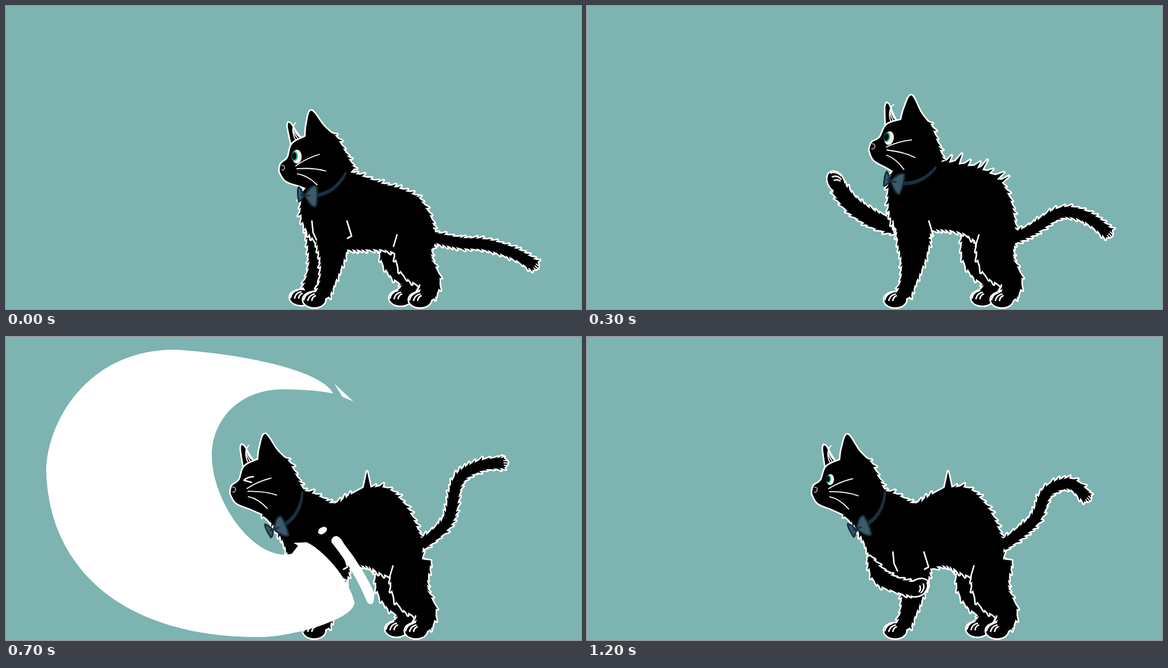
Animation of 1000x527 px, one loop 1400 ms. Source, as an HTML page:

```html
<!DOCTYPE html>
<html lang="en">
<head>
<meta charset="utf-8">
<title>Cat swipe</title>
<style>
html, body { margin: 0; width: 100%; height: 100%; overflow: hidden; background: #7db3b0; }
svg { display: block; width: 100%; height: 100%; }
.rim { fill: #fff; stroke: #fff; stroke-width: 5.4; stroke-linejoin: round; }
.line { fill: none; stroke: #fff; stroke-width: 2.6; stroke-linecap: round; stroke-linejoin: round; }
.thin { stroke-width: 1.8; }
.smear path { fill: #fff; transform-box: fill-box; transform-origin: center; }
</style>
</head>
<body>
<svg id="stage" viewBox="0 0 1000 527"></svg>
<script>
const stage = document.getElementById('stage');
const STEP = 100, LOOP = 1400;

// ---- geometry ----
const rnd = i => { const v = Math.sin(i * 91.7 + 4.1) * 4375.5; return v - Math.floor(v); };
const points = s => s.trim().split(/\s+/).map(p => p.split(',').map(Number));
const path = p => 'M' + p.map(q => q.map(v => v.toFixed(1))).join('L') + 'Z';

function unit(a, b) {
  const dx = b[0] - a[0], dy = b[1] - a[1], l = Math.hypot(dx, dy) || 1;
  return [dx / l, dy / l];
}

// Catmull-Rom curve sampled about every 2.5 px
function spline(p) {
  const out = [p[0]];
  for (let i = 0; i < p.length - 1; i++) {
    const b = p[i], c = p[i + 1], a = p[i - 1] || b, d = p[i + 2] || c;
    const n = Math.max(2, Math.round(Math.hypot(c[0] - b[0], c[1] - b[1]) / 2.5));
    for (let k = 1; k <= n; k++) {
      const t = k / n;
      out.push(b.map((v, j) => v + t / 2 * (c[j] - a[j] +
        t * (2 * a[j] - 5 * v + 4 * c[j] - d[j] + t * (3 * (v - c[j]) + d[j] - a[j])))));
    }
  }
  return out;
}

// Saw teeth along a curve; the sign of amp sets which way they lean
function fur(p, amp, len = 4) {
  const out = [];
  for (let i = 0, k = 0; i < p.length - 1; k++) {
    const n = Math.min(i + Math.floor(len * (.8 + .7 * rnd(k))), p.length - 1);
    const a = p[i], b = p[n], [tx, ty] = unit(a, b);
    const h = Math.abs(amp) * (.5 + .7 * rnd(k + 40));
    const at = (f, along, up) => [a[0] + (b[0] - a[0]) * f + tx * along + ty * up,
                                  a[1] + (b[1] - a[1]) * f + ty * along - tx * up];
    if (amp > 0) out.push(a, at(.6, 0, h * .25), at(1, 2, h), at(1, -1, -1));
    else out.push(at(0, 1, -1), at(0, -2, h), at(.4, 0, h * .25), b);
    i = n;
  }
  return out;
}

// "amp/length:points|..." where amp 0 is smooth and L is straight
function outline(s) {
  const out = [];
  let last;
  for (const part of s.split('|')) {
    const [mode, body] = part.split(':'), p = points(body), [amp, len] = mode.split('/').map(Number);
    if (last) p.unshift(last);
    last = p[p.length - 1];
    const curve = mode === 'L' ? p : spline(p);
    out.push(...(amp ? fur(curve, amp, len) : curve));
  }
  return path(out);
}

// Furry tube around a centre line; a third coordinate sets its half width
function limb(s, width) {
  const c = spline(points(s)), e = c.length - 1;
  const side = k => c.map(([px, py, w = width], i) => {
    const [x, y] = unit(c[Math.max(0, i - 1)], c[Math.min(e, i + 1)]);
    return [px + y * w * k, py - x * w * k];
  });
  const [tx, ty] = unit(c[e - 1], c[e]), w = (c[e][2] || width) * .8;
  const l = side(1), r = side(-1).reverse();
  const cap = spline([l[e], [c[e][0] + tx * w, c[e][1] + ty * w], r[0]]);
  return path([...fur(l, 4), ...cap, ...fur(r, -4)]);
}

// Crescent sliver between two points
function lens(x1, y1, x2, y2, bend, w) {
  const [x, y] = unit([x1, y1], [x2, y2]);
  const mid = k => `${(x1 + x2) / 2 + y * k},${(y1 + y2) / 2 - x * k}`;
  return `M${x1},${y1}Q${mid(bend + w / 2)} ${x2},${y2}Q${mid(bend - w / 2)} ${x1},${y1}Z`;
}

// ---- shapes ----
const HEAD = outline('0:476,288 478,275 490,264 498,240 521,227|0:523,205 531,182 552,208 566,221|' +
  '5/4:575,229 597,268 605,283|0:560,325 530,320|0:512,313 487,304 476,288');
const EAR = outline('0:497,243 490,208 494,204 505,221 514,232');
const HIND = limb('712,385,34 708,425,31 714,450,29 737,478,18 732,505,13');
const FAR_HIND = limb('675,385,22 672,430,21 685,458,19 704,478,14 695,500,12');
const LEG = limb('568,360,28 568,405,28 567,440,20 560,475,13 551,502,11');
const PAW = 'M-19,0a19,13 0 1,1 38,0a19,13 0 1,1 -38,0Z';
const TOES = 'M-18,0q2,-10 13,-13M-11,1q2,-9 11,-11M-4,1q1,-6 6,-8';
const CLAWS = [-1, 0, 1].map(k => limb(`667,202,9 ${668 + k * 12},${174 + k * 3},${9 - k * 2} ${672 + k * 22},${157 + k * 4},2`));

const crouch = {
  head: '475 281 0', bow: '518 328 0', hind: '0', eye: 1,
  torso: '6/4:602,290 650,308 690,320 718,334|5/4:738,366 744,395|' +
    '-5/4:742,420 690,430 655,423 605,423 560,420 532,402 514,365 520,318 560,280',
  tail: '742,402 790,412 835,415 885,431 920,452',
  arm: '532,380,12 536,420,10 537,455,10 526,492,9@513,507,0'
};
const rise = {
  ...crouch, head: '487 246 3.2', bow: '524 301 10', hind: '1',
  torso: '10/4:612,268 650,274 685,287 722,300|5/4:737,350 745,392|' +
    '-5/4:744,415 690,415 655,391 612,384 570,395 536,385 522,350 526,290 560,255',
  tail: '742,402 775,386 825,356 870,362 904,389',
  arm: '545,382,14 515,381,13 485,378,14 472,390,14@471,406,-45'
};
const arch = {
  ...rise, head: '496 240 17.3', bow: '531 304 14', hind: '2', eye: 0,
  torso: '24/6:624,274 665,281 700,288 722,316|5/4:739,338 745,392|' +
    '-5/4:744,415 690,415 655,398 612,392 570,395 540,390 529,350 532,295 570,255',
  tail: '742,406 775,391 825,362 870,373 911,403',
  arm: '600,300,14 590,250,14 578,215,12 566,195,10@554,181,60'
};
const reach = {
  ...arch, bow: '530 302 6', claws: true,
  tail: '742,396 775,379 825,343 870,352 912,378',
  arm: '635,275,12 648,245,15 662,215,15 666,200,13@667,190,90'
};
const lunge = {
  head: '391 265 3.6', bow: '467 333 -24', hind: '-7', eye: .8, swipe: true,
  torso: '6/4:512,266 540,275 570,291 600,274|L:622,262 628,234 634,262|6/4:666,265 700,302 722,352|' +
    '-5/4:724,375 715,415 665,415 625,397 592,404 540,420 503,405 482,355 460,320 445,303 480,260',
  tail: '722,364 778,318 800,270 840,255 870,280',
  arm: '490,382,2 508,415,12 535,430,11 565,438,11@576,436,150'
};

const SWOOSH = [
  'M569,98C545,55 400,28 293,22C140,22 70,150 70,235C75,400 200,522 440,522C500,522 606,490 606,462' +
    'C600,430 560,375 523,357L500,358L508,363L497,377C435,392 358,290 358,205C358,150 400,92 480,91Q530,91 569,98Z',
  'M571,81L604,112L585,104Z',
  'M543,341Q542,332 553,330Q561,331 557,338Q549,347 543,341Z',
  'M566,357Q565,347 575,346Q582,348 588,360Q620,400 641,446L639,462Q634,468 628,461Q605,405 566,357Z'
];
const SHARDS = [
  lens(60, 323, 117, 415, -18, 10), lens(125, 73, 175, 40, 9, 9), lens(374, 392, 353, 511, 16, 10),
  lens(411, 473, 413, 520, 0, 7), lens(601, 301, 684, 382, 18, 10), lens(100, 359, 113, 373, 0, 2),
  'M458,390L487,389L470,455Z', 'M500,387L515,385L557,483Q530,490 503,501Z',
  'M527,333L548,325L665,405Q660,425 630,442L598,462L550,370Q570,362 563,348Q555,336 527,333Z'
];

// ---- timeline ----
const mix = (a, b, k = .5) => {
  const n = b.match(/-?[\d.]+/g);
  let i = 0;
  return a.replace(/-?[\d.]+/g, v => +v + (n[i++] - v) * k);
};
function between(a, b) {
  const p = { ...a };
  for (const key of ['head', 'bow', 'hind', 'torso', 'tail', 'arm']) p[key] = mix(a[key], b[key]);
  return p;
}
const poses = [
  crouch, between(crouch, rise), rise,
  { ...between(rise, arch), arm: '540,385,12 500,372,13 460,345,13 438,317,12@433,306,60' },
  arch, between(arch, reach), reach,
  { ...lunge, head: '390 265 2.8', bow: '464 334 -24', eye: 0, smear: SWOOSH, size: 1,
    tail: '722,362 768,320 786,250 825,224 866,219' },
  ...[1, .7, .4, .15].map(size => ({ ...lunge, smear: SHARDS, size })),
  lunge
];

// ---- drawing ----
const line = (d, cls = '') => `<path class="line ${cls}" d="${d}"/>`;
const group = (tf, inner) => `<g transform="${tf}">${inner}</g>`;
const layer = (...shapes) => ['class="rim"', ''].map(a =>
  shapes.map(([d, tf = '']) => `<path ${a} d="${d}" transform="${tf}"/>`).join('')).join('');
const place = (x, y, r = 0) => `translate(${x},${y}) rotate(${r})`;
const foot = (limbPath, tf) => layer([limbPath], [PAW, tf]) + group(tf, line(TOES));

const eye = size => size
  ? group(`translate(506,262) scale(${size})`, '<ellipse rx="8.200" ry="12" fill="#fff1e8"/>' +
    '<ellipse cx="-4" cy="-1" rx="5.500" ry="8.500" fill="#16b5a2"/><ellipse cx="-5" cy="-1" rx="4" ry="6.500"/>')
  : line('M514,257Q503,258 498,264L511,267');
const FACE = line('M504,278Q522,265 545,258M506,283Q535,281 556,287M507,292Q525,295 541,311', 'thin') +
  '<path d="M478,277q8,-1 6,6q-2,4 -5,2" fill="none" stroke="#b9b9b9" stroke-width="1.500"/>';
const EAR_HAIR = line('M504,203Q493,212 507,230M500,207Q501,222 512,229M499,212Q498,224 504,233', 'thin');
const BOW = '<path d="M21,-2Q53,-6 72,-40L75,-37Q58,-1 21,5Z" fill="#17303f"/>' +
  '<g fill="#3d5a68" stroke="#17303f" stroke-width="3" stroke-linejoin="round">' +
  '<path d="M2,0L11,-11Q18,-17 22,-14Q25,2 21,20Q18,23 12,17Q5,9 2,2Z"/>' +
  '<path d="M-1,0Q-5,-10 -9,-13Q-12,-8 -9,12Q-6,13 -1,3Z"/><path d="M2,1L11,2M-2,1L-6,0"/></g>';

function tailTip(s) {
  const [a, b] = points(s).slice(-2), [x, y] = unit(a, b);
  return line([-4, 0, 4].map(k => `M${b[0] + y * k},${b[1] - x * k}l${x * 6 - y},${y * 6 + x}`).join(''), 'thin');
}

function draw(p) {
  const headAt = place(...p.head.split(' ')) + ' translate(-475,-281)';
  const hindAt = place(p.hind, 0);
  const [bone, hand] = p.arm.split('@'), handAt = place(...hand.split(','));
  const arm = p.claws ? layer([limb(bone)], ...CLAWS.map(c => [c])) : foot(limb(bone), handAt);
  const [front, near] = [place(536, 511), place(720, 511)];
  return '<rect width="1000" height="527" fill="#7db3b0"/>' +
    group(hindAt, foot(FAR_HIND, place(686, 508))) + (p.swipe ? '' : arm) +
    layer([EAR, headAt]) + group(headAt, EAR_HAIR) +
    layer([limb(p.tail, 8.5)], [HIND, hindAt], [PAW, `${hindAt} ${near}`], [LEG], [PAW, front],
      [outline(p.torso)], [HEAD, headAt]) +
    tailTip(p.tail) + group(front, line(TOES)) + (p.swipe ? arm : '') +
    group(hindAt, group(near, line(TOES)) + line('M680,398L674,418M593,374L601,400L594,404')) +
    line('M532,374L534,394L540,407') +
    group(headAt, FACE + eye(p.eye)) + group(place(...p.bow.split(' ')), BOW) +
    (p.smear ? `<g class="smear">${p.smear.map(d => `<path d="${d}" style="transform:scale(${p.size})"/>`).join('')}</g>` : '');
}

const pictures = poses.map(draw);
let shown = -1;
function tick(now) {
  const i = Math.min(poses.length - 1, Math.floor(now % LOOP / STEP));
  if (i !== shown) stage.innerHTML = pictures[shown = i];
  requestAnimationFrame(tick);
}
tick(0);
</script>
</body>
</html>
```
